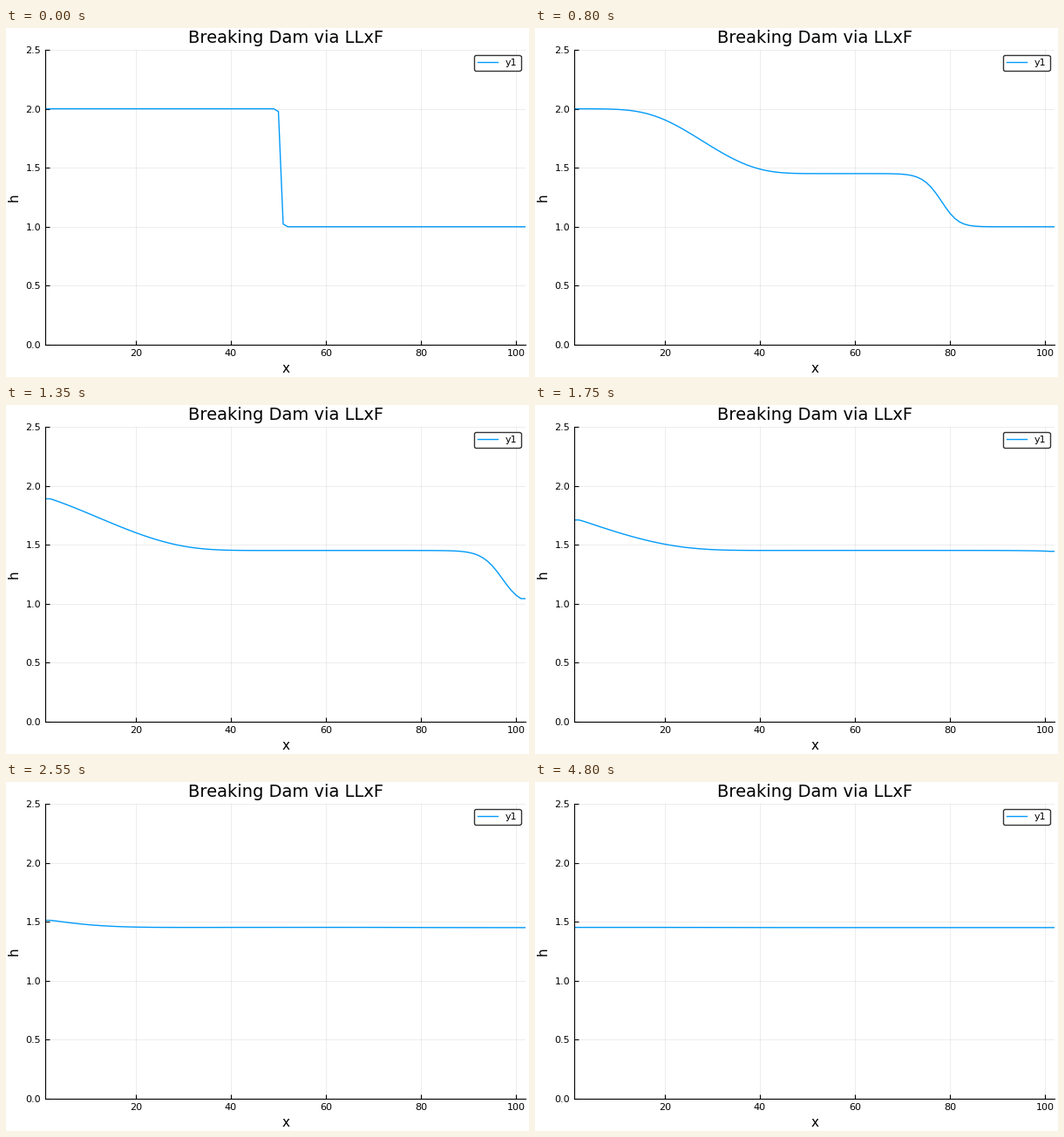
These frames come from a looping animation (600 px wide and 400 px high, 5000 ms). A matplotlib script:

```python
import matplotlib.pyplot as plt
import numpy as np
from matplotlib.animation import FuncAnimation

W, H, DPI = 600, 400, 100
LEFT, RIGHT, TOP, BOTTOM = 45.2, 596.2, 25, 363
FRAMES, INTERVAL = 100, 50
CELLS, DAM = 102, 50
STEPS_PER_FRAME = 40
GRAVITY = 9.81
DT_DX = 0.0102
BLUE = "#009AFA"


def flux(state):
    h, q = state
    return np.array([q, q * q / h + GRAVITY * h * h / 2])


def step(state):
    """Advance one local Lax-Friedrichs step with open ends."""
    h, q = state
    speed = np.abs(q / h) + np.sqrt(GRAVITY * h)
    a = np.maximum(speed[:-1], speed[1:])
    f = flux(state)
    face = (f[:, :-1] + f[:, 1:] - a * (state[:, 1:] - state[:, :-1])) / 2
    new = state.copy()
    new[:, 1:-1] -= DT_DX * (face[:, 1:] - face[:, :-1])
    new[:, 0], new[:, -1] = new[:, 1], new[:, -2]
    return new


def simulate():
    state = np.zeros((2, CELLS))
    state[0] = np.where(np.arange(CELLS) < DAM, 2.0, 1.0)
    state = step(state)
    heights = []
    for _ in range(FRAMES):
        heights.append(state[0])
        for _ in range(STEPS_PER_FRAME):
            state = step(state)
    return heights


plt.rcParams["font.family"] = "DejaVu Sans"
fig = plt.figure(figsize=(W / DPI, H / DPI), dpi=DPI, facecolor="white")
ax = fig.add_axes([LEFT / W, 1 - BOTTOM / H,
                   (RIGHT - LEFT) / W, (BOTTOM - TOP) / H])
ax.set_xlim(1, CELLS)
ax.set_ylim(0, 2.5)
ax.set_xticks(range(20, 101, 20))
ax.set_yticks(np.arange(0, 2.6, 0.5))
ax.tick_params(direction="in", labelsize=8)
ax.grid(color="black", alpha=0.1, linewidth=0.5)
ax.set_axisbelow(True)
ax.spines[["top", "right"]].set_visible(False)
ax.set_title("Breaking Dam via LLxF", fontsize=14)
ax.set_xlabel("x", fontsize=11)
ax.set_ylabel("h", fontsize=11)

heights = simulate()
x = np.arange(1, CELLS + 1)
line, = ax.plot(x, heights[0], color=BLUE, linewidth=1, label="y1")
ax.legend(loc="upper right", fontsize=8, edgecolor="black", framealpha=0.8)


def draw(i):
    line.set_ydata(heights[i])
    return line,


anim = FuncAnimation(fig, draw, frames=FRAMES, interval=INTERVAL,
                     repeat=True, repeat_delay=0)
plt.show()
```
